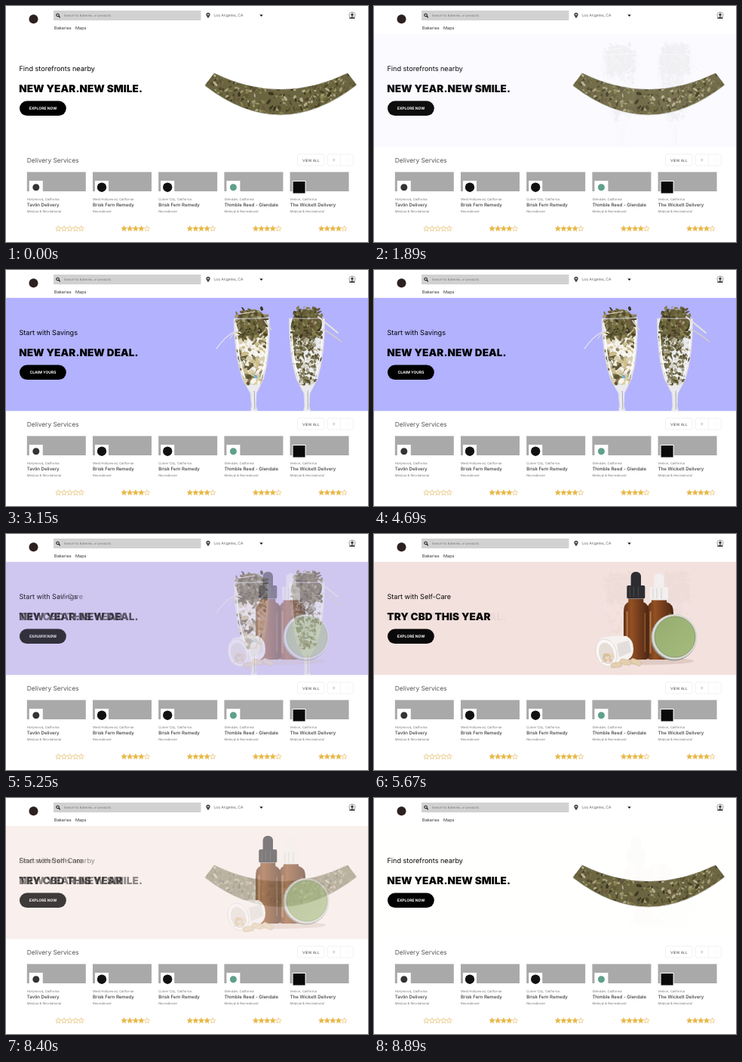
Write an HTML page that moves like this. It is 480 px wide and 312 px high and loops after 8960 ms.

```html
<!DOCTYPE html>
<html lang="en">
<head>
<meta charset="utf-8">
<title>Storefront carousel</title>
<style>
  html, body { margin: 0; width: 100%; height: 100%; overflow: hidden; background: #fff; }
  svg { display: block; width: 480px; height: 312px; }
  text { font-family: Inter, "Liberation Sans", sans-serif; text-rendering: geometricPrecision; }
</style>
</head>
<body>
<svg id="stage" viewBox="0 0 480 312" xmlns="http://www.w3.org/2000/svg"></svg>
<script>
const LOOP = 8960;
const FADE = 1330;
const STARTS = [1560, 4620, 7770];
const COLORS = [[255, 255, 255], [178, 178, 255], [245, 227, 221]];
const TOP = 36.6, BOTTOM = 186.6;

let seed = 7;
function rnd() {
  seed = (seed * 16807) % 2147483647;
  return seed / 2147483647;
}

const text = (x, y, size, str, fill = '#000', weight = 400, extra = '') =>
  `<text x="${x}" y="${y}" font-size="${size}" fill="${fill}" font-weight="${weight}" ${extra}>${str}</text>`;
const rect = (x, y, w, h, fill, r = 0, extra = '') =>
  `<rect x="${x}" y="${y}" width="${w}" height="${h}" rx="${r}" fill="${fill}" ${extra}/>`;
const circle = (x, y, r, fill, extra = '') =>
  `<circle cx="${x}" cy="${y}" r="${r}" fill="${fill}" ${extra}/>`;
const path = (d, fill = 'none', extra = '') => `<path d="${d}" fill="${fill}" ${extra}/>`;
const line = (d, stroke, width = 1) =>
  path(d, 'none', `stroke="${stroke}" stroke-width="${width}" stroke-linecap="round"`);

// Scatter small tilted flakes over a box
function flakes(n, x, y, w, h, size, tones) {
  let out = '';
  for (let i = 0; i < n; i++) {
    const cx = (x + rnd() * w).toFixed(1), cy = (y + rnd() * h).toFixed(1);
    const rx = (size * (0.4 + rnd())).toFixed(1), ry = (size * (0.25 + rnd() * 0.5)).toFixed(1);
    const tone = tones[Math.floor(rnd() * tones.length)];
    out += `<ellipse cx="${cx}" cy="${cy}" rx="${rx}" ry="${ry}" fill="${tone}"
      transform="rotate(${Math.floor(rnd() * 180)} ${cx} ${cy})"/>`;
  }
  return out;
}

function star(cx, cy, full) {
  let pts = '';
  for (let i = 0; i < 10; i++) {
    const r = i % 2 ? 1.65 : 3.8, a = i * Math.PI / 5 - Math.PI / 2;
    pts += `${(cx + r * Math.cos(a)).toFixed(2)},${(cy + r * Math.sin(a)).toFixed(2)} `;
  }
  return `<polygon points="${pts}" fill="${full ? '#e9b93c' : '#fff'}" stroke="#e2b652" stroke-width=".6"/>`;
}

function header() {
  return rect(0, 0, 480, TOP, '#fff') +
    circle(36.5, 17.3, 6, '#2b2220') +
    rect(63, 6, 195.5, 13, '#d1d1d1', 1.2) +
    circle(68.6, 12, 1.8, 'none', 'stroke="#111" stroke-width="1"') +
    line('M70 13.5 L71.5 15', '#111', 1.1) +
    text(76.5, 14, 4.1, 'Search for Bakeries, or products', '#777') +
    path('M268 16.3 C266.5 13.7 265.4 12.7 265.4 11.4 A2.6 2.6 0 0 1 270.6 11.4 C270.6 12.7 269.5 13.7 268 16.3Z', '#444') +
    circle(268, 11.3, 0.9, '#fff') +
    text(275.5, 14.4, 5, 'Los Angeles, CA', '#666') +
    path('M336.2 11.5 H340.8 L338.5 14Z', '#111') +
    circle(459, 12.2, 4, '#fff', 'stroke="#555" stroke-width=".6"') +
    `<ellipse cx="459" cy="11.6" rx="1.7" ry="2.1" fill="#444"/>` +
    path('M454.8 16.8 Q455.6 14.8 458 14.2 H460 Q462.4 14.8 463.2 16.8Z', '#444') +
    text(64, 31.2, 5.6, 'Bakeries', '#333') +
    text(92, 31.2, 5.6, 'Maps', '#333');
}

const CARDS = [
  ['Hollywood', 'Tavlin Delivery', 'Medical &amp; Recreational', '#333', 0],
  ['West Hollywood', 'Brisk Fern Remedy', 'Recreational', '#111', 4],
  ['Culver City', 'Brisk Fern Remedy', 'Recreational', '#111', 4],
  ['Glendale', 'Thimble Reed - Glendale', 'Medical &amp; Recreational', '#5f9f8c', 4],
  ['Venice', 'The Wickett Delivery', 'Medical &amp; Recreational', '#0a0a0a', 4]
];

function card([city, name, kind, tone, score], i) {
  const x = 27.8 + i * 87.2;
  let out = rect(x, 219.5, 78, 25.5, '#a9a9a9') +
    rect(x + 3, 231, 18, 17, '#fff') +
    (i === 4 ? rect(x + 4, 232, 16, 15.5, tone) : circle(x + 12, 239.7, i % 3 ? 6.2 : 4.5, tone)) +
    text(x, 256.6, 4.25, city + ', California', '#777') +
    text(x, 265.2, 6.1, name, '#3a3a3a', 500) +
    text(x, 272.7, 4.2, kind, '#777');
  for (let k = 0; k < 5; k++) out += star(x + 41.6 + k * 7.6, 294.4, k < score);
  return out;
}

function services() {
  const edge = 'stroke="#ececec" stroke-width=".7"';
  return rect(0, BOTTOM, 480, 312 - BOTTOM, '#fff') +
    text(27.8, 206.8, 8.35, 'Delivery Services', '#555') +
    rect(386.5, 196, 35.5, 15, '#fff', 1.5, edge) +
    text(404.3, 205.5, 4.8, 'VIEW ALL', '#666', 500, 'text-anchor="middle"') +
    rect(426.5, 196, 34, 15, '#fff', 1.5, edge) +
    line('M443.5 196 V211', '#ececec', 0.7) +
    line('M435.4 202.2 L434.1 203.6 L435.4 205', '#666', 0.7) +
    line('M451.6 202.4 L452.8 203.6 L451.6 204.8', '#ddd', 0.6) +
    CARDS.map(card).join('');
}

const copy = (lead, title, action) =>
  text(17.5, 86.4, 9.1, lead) +
  text(17.3, 114, 13.5, title, '#000', 900, 'letter-spacing=".08"') +
  rect(18, 125.6, 61.8, 19.4, '#000', 9.7) +
  text(49, 137.2, 5, action, '#fff', 700, 'text-anchor="middle"');

const NEW_YEAR = 'NEW YEAR. <tspan dx="-2">NEW</tspan> ';
const LEAF = ['#4c4527', '#6d6539', '#8a8252', '#3b3520', '#7c7446', '#5a5a34', '#a09a70', '#655339'];
const STRAW = ['#f4f1e6', '#d9cfae', '#f8f6f0', '#8b8058', '#5d5534', '#b4a98a', '#cdbd8c'];
const FROST = ['#6d6746', '#8b8462', '#a8a388', '#56512f', '#d8d6cc', '#77714f', '#f0efea'];

function smile() {
  const d = 'M276 89 Q364 132 453 89 L464.5 104 Q364 182 264 105Z';
  return `<clipPath id="arc">${path(d)}</clipPath>` +
    path(d, '#d3d0c6', 'transform="translate(.4 1.2)"') + path(d, '#6a6440') +
    `<g clip-path="url(#arc)">${flakes(520, 262, 88, 204, 57, 2.8, [...LEAF, '#b3aa8a'])}</g>` +
    path(d, 'none', 'stroke="#5b5537" stroke-width=".5"');
}

function glass(cx, id, tones, length) {
  const at = (s) => cx + s;
  const bowl = `M${at(-23.5)} 64 Q${at(-24)} 112 ${at(-14)} 144 Q${at(-8)} 156 ${at(-4)} 163
    L${at(-3)} 180 L${at(-5)} 188 H${at(5)} L${at(3)} 180 L${at(4)} 163
    Q${at(8)} 156 ${at(14)} 144 Q${at(24)} 112 ${at(23.5)} 64Z`;
  return `<clipPath id="${id}">${path(bowl)}</clipPath>` +
    path(bowl, '#eeeeee', 'opacity=".94"') +
    `<g clip-path="url(#${id})">` +
      flakes(170, cx - 19, 82, 38, 46, length, tones) +
      flakes(60, cx - 12, 124, 24, 26, length, tones) + '</g>' +
    `<ellipse cx="${cx}" cy="70" rx="20" ry="18" fill="#6b6340"/>` +
    flakes(120, cx - 20, 56, 40, 34, 3, LEAF) + flakes(28, cx - 15, 49, 30, 10, 2.6, LEAF) +
    path(bowl, 'none', 'stroke="#d6d6dc" stroke-width=".9"') +
    line(`M${cx - 20} 84 Q${cx - 19} 118 ${cx - 11} 142`, '#fff', 1.6) +
    line(`M${cx + 20} 92 Q${cx + 18} 122 ${cx + 10} 144`, '#fff', 1.3) +
    line(`M${cx + 1.2} 160 V184`, '#a9a9b0', 1);
}

function toast() {
  return line('M304 81 Q290 88 279 104', '#e8e6ea', 1.3) +
    line('M307 74 L297 91', '#d9d6d0', 1.2) +
    `<g transform="rotate(-1.5 327 120)">${glass(327, 'left', STRAW, 4.2)}</g>` +
    glass(399, 'right', FROST, 3.4) +
    line('M311 58 L330 55', '#e6dfca', 1) + line('M343 67 L352 79', '#d8d1bd', 1.6) +
    line('M414 62 L440 83', '#e8e4da', 2) + line('M419 78 Q432 84 445 95', '#d5d0c2', 1.4) +
    circle(331, 141, 2, '#6bb5c9');
}

function bottle(x, w, cap, mid, top) {
  const collar = top + 18, r = x + w;
  return path(`M${mid - 10} 86 H${mid + 10} V90 Q${r} 92 ${r} 104 V161 Q${r} 166 ${r - 5} 166
      H${x + 5} Q${x} 166 ${x} 161 V104 Q${x} 92 ${mid - 10} 90Z`, 'url(#amber)') +
    rect(x + 3.5, 102, 2.2, 56, '#c98347', 1, 'opacity=".7"') +
    rect(r - 6, 104, 1.4, 52, '#b06f38', 0.7, 'opacity=".6"') +
    rect(mid - 6.7, top, 13.4, 24, cap, 6) +
    rect(mid - 12, collar, 24, 17.5, cap, 2) +
    [-8, -3, 3].map(s => line(`M${mid + s} ${collar + 2} V${collar + 15}`, '#8888', 0.6)).join('');
}

function remedies() {
  return `<defs><linearGradient id="amber">
      <stop offset="0" stop-color="#5c2b10"/><stop offset=".3" stop-color="#8f4b1c"/>
      <stop offset=".65" stop-color="#6b3413"/><stop offset="1" stop-color="#43200c"/></linearGradient>
    <linearGradient id="balm" x2="1" y2="1"><stop offset="0" stop-color="#91aa6b"/>
      <stop offset="1" stop-color="#a3bb7a"/></linearGradient></defs>` +
    '<ellipse cx="362" cy="168" rx="62" ry="5" fill="#cdb3aa" opacity=".5"/>' +
    bottle(362, 35, '#f3f0ef', 378, 52) +
    bottle(331, 33.5, '#25252a', 347.3, 50) +
    circle(397.5, 137, 30.5, '#8e9089') + circle(398.5, 136, 30, '#d7d9d2') +
    circle(399, 136, 27, 'url(#balm)', 'stroke="#73845c" stroke-width=".7"') +
    path('M300 138 Q318 133 335 135 Q344 140 344 152 Q344 162 337 166 L312 175 Q297 174 295 160Z', '#f5f3f1') +
    path('M322 145 L338 141 L341 156 L325 163Z', '#e2dedb') +
    '<g transform="rotate(-17 308 157)"><ellipse cx="308" cy="157" rx="13.5" ry="18.5" fill="#faf9f8" stroke="#dcd6d2" stroke-width=".8"/>' +
    '<ellipse cx="308" cy="158" rx="10" ry="14.5" fill="#e6ddd7"/></g>' +
    flakes(9, 303, 160, 13, 9, 3.2, ['#e7d3b4', '#d8c09c']) +
    [[321, 173, -8], [333, 169, 12], [347, 169, 24]].map(([x, y, a]) =>
      rect(x - 7, y - 3, 15, 6.4, '#e3cfae', 3.2, `stroke="#c4aa86" stroke-width=".5" transform="rotate(${a} ${x} ${y})"`)).join('');
}

const slides = [
  copy('Find storefronts nearby', NEW_YEAR + 'SMILE.', 'EXPLORE NOW') + smile(),
  copy('Start with Savings', NEW_YEAR + 'DEAL.', 'CLAIM YOURS') + toast(),
  copy('Start with Self-Care', 'TRY CBD THIS YEAR', 'EXPLORE NOW') + remedies()
];

const stage = document.getElementById('stage');
stage.innerHTML = rect(0, TOP, 480, BOTTOM - TOP, '#fff', 0, 'id="back"') +
  slides.map(s => `<g class="slide">${s}</g>`).join('') + header() + services();
const back = document.getElementById('back');
const groups = [...document.querySelectorAll('.slide')];

const ease = (p) => p < 0.5 ? 4 * p ** 3 : 1 - 4 * (1 - p) ** 3;

function draw(now) {
  const t = now % LOOP;
  let from = 0, to = 0, mix = 0;
  STARTS.forEach((start, i) => {
    if (t >= start) {
      from = i;
      to = (i + 1) % 3;
      mix = ease(Math.min(1, (t - start) / FADE));
    }
  });
  groups.forEach((g, i) => {
    const alpha = (i === from ? 1 - mix : 0) + (i === to ? mix : 0);
    g.style.opacity = alpha;
    g.style.display = alpha > 0 ? '' : 'none';
  });
  const rgb = COLORS[from].map((c, k) => Math.round(c + (COLORS[to][k] - c) * mix));
  back.setAttribute('fill', `rgb(${rgb})`);
}

const begin = performance.now();
function tick() {
  draw(performance.now() - begin);
  requestAnimationFrame(tick);
}
tick();
</script>
</body>
</html>
```
